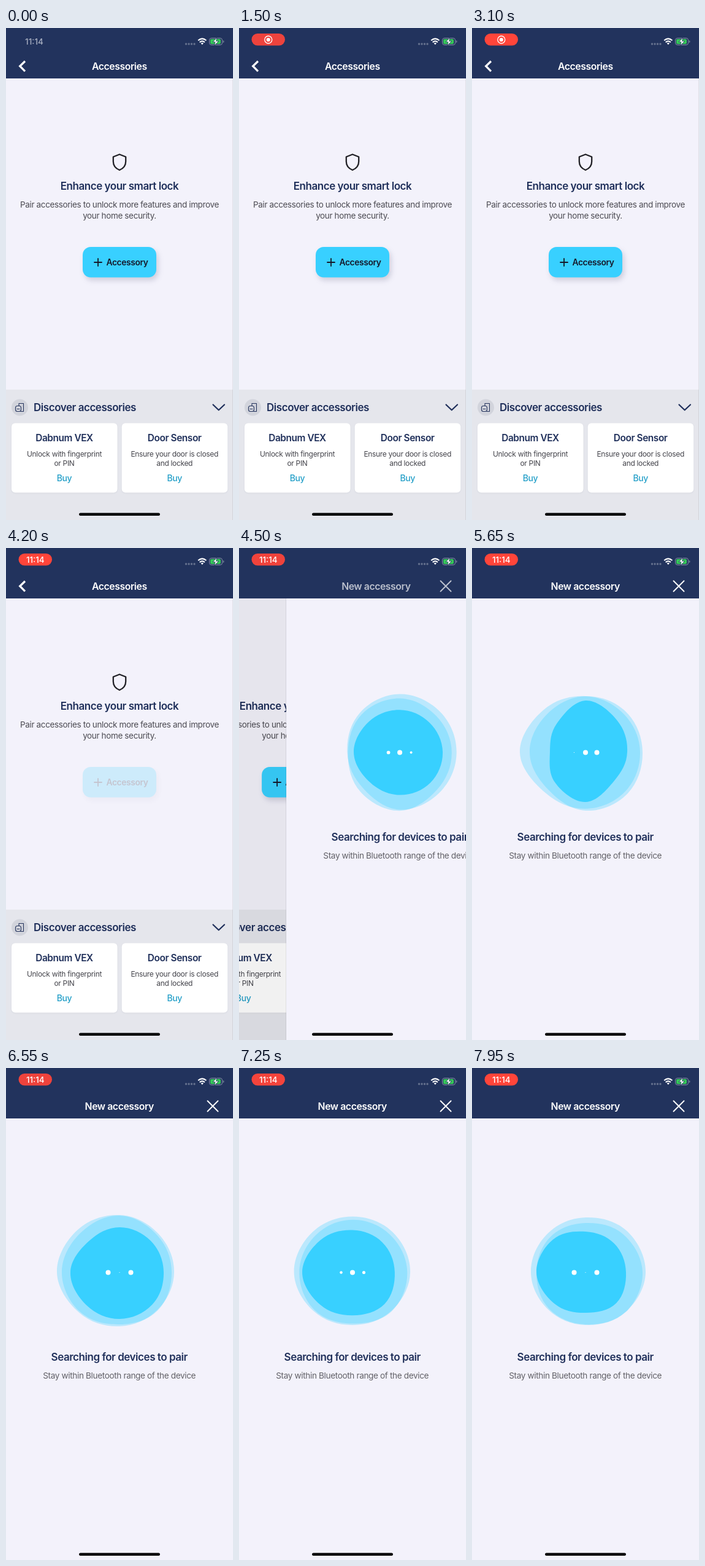
Animation of 370x800 px, one loop 8 s. Source, as an HTML page:

```html
<!DOCTYPE html>
<html lang="en">
<head>
<meta charset="utf-8">
<title>Accessories</title>
<style>
html, body { margin: 0; width: 100%; height: 100%; overflow: hidden; background: #f3f2fb; }
svg { display: block; width: 100vw; height: 100vh; }
text { font-family: Inter, "Open Sans", sans-serif; letter-spacing: -.027em; text-anchor: middle; }
.line { fill: none; stroke-linecap: round; stroke-linejoin: round; }
.bar { font-size: 15.8px; font-weight: 600; fill: #fff; }
.head { font-size: 17px; font-weight: 600; fill: #1f2f5a; }
.body { font-size: 13.5px; fill: #4c4b52; }
.name { font-size: 15.4px; font-weight: 600; fill: #1f2f5a; }
.note { font-size: 12px; fill: #45454c; }
.buy { font-size: 14px; font-weight: 500; fill: #249fc8; }
.clock { font-size: 13.5px; font-weight: 500; letter-spacing: 0; }
.shadow { filter: drop-shadow(3px 5px 4px rgba(60, 60, 100, .2)); }
.card { fill: #fff; filter: drop-shadow(0 1px 1px rgba(40, 50, 80, .07)); }
</style>
</head>
<body>
<svg viewBox="0 0 370 800" preserveAspectRatio="none">
  <g id="home">
    <rect width="370" height="800" fill="#f3f2fb"/>
    <path class="line" stroke="#222227" stroke-width="2.3" d="M185 205.5 195.2 209.5V217C195.2 223.5 191 228.5 185 231 179 228.5 174.8 223.5 174.8 217V209.5Z"/>
    <text class="head" x="185" y="263">Enhance your smart lock</text>
    <text class="body" x="185" y="292">Pair accessories to unlock more features and improve</text>
    <text class="body" x="185" y="310">your home security.</text>
    <g id="button">
      <rect class="shadow" x="125" y="356" width="120" height="49.5" rx="13" fill="#38d0ff"/>
      <path class="line" stroke="#15192b" stroke-width="1.8" d="M144 381H156M150 375V387"/>
      <text x="197.5" y="386" font-size="13.8" font-weight="600" fill="#15192b">Accessory</text>
    </g>
    <rect y="588" width="370" height="212" fill="#e5e6ec"/>
    <circle cx="22.5" cy="617" r="13.5" fill="#d2d4dc"/>
    <g class="line" stroke="#27365f" stroke-width="1.1">
      <path d="M21 614V610.5H28.5V623.5H24"/>
      <rect x="15.5" y="614.5" width="9" height="9" rx="3"/>
      <path d="M18 619.5H22"/>
    </g>
    <text class="head" x="128.5" y="623">Discover accessories</text>
    <path class="line" stroke="#1f2f5a" stroke-width="2.2" d="M337.5 612.5 346.7 621.3 356 612.5"/>
    <g id="cards"></g>
    <rect id="dim" width="370" height="800" opacity="0"/>
  </g>
  <g id="search">
    <rect x="-1" width="1" height="800" fill="#000" opacity=".08"/>
    <rect width="370" height="800" fill="#f3f2fb"/>
    <g id="blobs" fill="#38d0ff"></g>
    <g id="dots" fill="#fff"></g>
    <text class="head" x="184.7" y="476">Searching for devices to pair</text>
    <text class="body" x="184.7" y="505" style="font-size:13.6px;fill:#626167">Stay within Bluetooth range of the device</text>
  </g>

  <rect width="370" height="82" fill="#22335d"/>
  <text id="oldTitle" class="bar" x="184.8" y="68.3">Accessories</text>
  <path id="back" class="line" style="stroke-linecap:butt;stroke-linejoin:miter" stroke="#fff" stroke-width="3.2" d="M31 54 22.7 62 31 70.3"/>
  <text id="newTitle" class="bar" x="184.8" y="68.3">New accessory</text>
  <path id="close" class="line" stroke="#fff" stroke-width="1.9" d="M328.5 53.5 345.5 70.5M345.5 53.5 328.5 70.5"/>

  <g fill="#66728f">
    <circle cx="293.5" cy="26" r="1.7"/><circle cx="298" cy="26" r="1.7"/>
    <circle cx="302.5" cy="26" r="1.7"/><circle cx="307" cy="26" r="1.7"/>
  </g>
  <g class="line" stroke="#fff" stroke-width="2.1" style="stroke-linecap:butt">
    <path d="M313.2 20.2Q319.8 14.6 326.4 20.2M315.7 23.2Q319.8 19.6 323.9 23.2"/>
    <path d="M317.6 24.8Q319.8 23.2 322 24.8L319.8 27.2Z" fill="#fff" stroke="none"/>
  </g>
  <rect x="331.5" y="16.5" width="21" height="11" rx="3.4" fill="none" stroke="#8791a8"/>
  <path d="M354 20V24.2Q355.4 23.6 355.4 22.1T354 20" fill="#8791a8"/>
  <rect x="333" y="18" width="17" height="8" rx="2" fill="#35c759"/>
  <path d="M343.8 15.5 337 22.8H341L339.6 28.6 346.8 21.2H342.6Z" fill="#fff" stroke="#22335d" stroke-width=".8"/>

  <text id="plainClock" class="clock" x="46" y="26.7" fill="#a9b0c2">11:14</text>
  <rect id="pill" x="20.5" y="9" width="54.5" height="19.5" rx="9.75" fill="#ff453a"/>
  <g id="record" fill="#fff">
    <circle cx="47.8" cy="19" r="6" fill="none" stroke="#fff" stroke-width="1.3"/>
    <circle cx="47.8" cy="19" r="3.1"/>
  </g>
  <text id="pillClock" class="clock" x="47.8" y="23.8" fill="#fff">11:14</text>
  <rect x="119" y="788.5" width="132" height="4.5" rx="2.25" fill="#000"/>
</svg>
<script>
const LOOP = 8000, PUSH = 4340;
const el = id => document.getElementById(id);
const NS = "http://www.w3.org/2000/svg";

function add(parent, tag, attrs, label) {
  const node = document.createElementNS(NS, tag);
  for (const key in attrs) node.setAttribute(key, attrs[key]);
  if (label) node.textContent = label;
  return parent.appendChild(node);
}

function card(x, name, ...notes) {
  const mid = x + 86, box = el("cards");
  add(box, "rect", { class: "card", x, y: 642.5, width: 172.5, height: 113, rx: 6 });
  add(box, "text", { class: "name", x: mid, y: 671.7 }, name);
  notes.forEach((s, i) => add(box, "text", { class: "note", x: mid, y: 697 + 15 * i }, s));
  add(box, "text", { class: "buy", x: mid, y: 737 }, "Buy");
}
card(9, "Dabnum VEX", "Unlock with fingerprint", "or PIN");
card(188.7, "Door Sensor", "Ensure your door is closed", "and locked");

// Piecewise linear value, clamped at both ends.
function track(t, steps) {
  if (t <= steps[0][0]) return steps[0][1];
  for (let i = 1; i < steps.length; i++) {
    const [a, from] = steps[i - 1], [b, to] = steps[i];
    if (t < b) return from + (to - from) * (t - a) / (b - a);
  }
  return steps[steps.length - 1][1];
}

const PILL = [[50, 0], [450, .92], [1500, .92], [1600, .88], [2450, .88], [2700, 1], [3450, 1],
  [3600, .92], [3750, 1], [4350, 1], [4700, .85], [4800, .85], [5500, 1], [5800, 1],
  [6550, .92], [6750, .88], [7600, 1]];

// Radii at eight angles, clockwise from the right, one row per pose.
const POSE_TIMES = [4800, 5650, 6550, 7950];
const BLOBS = [
  { alpha: .3, poses: [
    [89, 92, 97, 84, 87, 94, 97, 91],
    [89, 91, 92, 93, 107, 97, 91, 88],
    [89, 87, 88, 93, 102, 97, 93, 89],
    [98, 92, 86, 86, 89, 88, 89, 95]] },
  { alpha: .3, poses: [
    [81, 84, 100, 94, 88, 91, 92, 83],
    [93, 96, 95, 86, 91, 88, 91, 93],
    [85, 88, 85, 91, 94, 90, 92, 86],
    [93, 92, 85, 84, 80, 81, 80, 87]] },
  { alpha: 1, poses: [
    [72, 70, 73, 68, 71, 68, 72, 70],
    [68, 66, 81, 70, 58, 66, 84, 73],
    [72, 75, 76, 76, 80, 71, 73, 72],
    [66, 71, 66, 72, 80, 75, 66, 66]] }
];
for (const blob of BLOBS) blob.node = add(el("blobs"), "path", { opacity: blob.alpha });
const dots = [166.5, 185, 203.5].map(cx => add(el("dots"), "circle", { cx, cy: 332.5 }));

function spline(a, b, c, d, u) {
  return b + u / 2 * (c - a + u * (2 * a - 5 * b + 4 * c - d + u * (3 * (b - c) + d - a)));
}

function radii(poses, t) {
  const pos = track(t, [[4000, -1], ...POSE_TIMES.map((time, i) => [time, i])]);
  const i = Math.floor(pos), pose = k => poses[(k + 4) % 4];
  return pose(0).map((_, n) =>
    spline(pose(i - 1)[n], pose(i)[n], pose(i + 1)[n], pose(i + 2)[n], pos - i));
}

function outline(rs) {
  const n = rs.length;
  const pts = rs.map((r, i) => [185 + r * Math.cos(i * 2 * Math.PI / n), 332 + r * Math.sin(i * 2 * Math.PI / n)]);
  const at = i => pts[(i + n) % n];
  const handle = (i, side) => [0, 1].map(k => at(i)[k] + side * (at(i + 1)[k] - at(i - 1)[k]) * .187);
  let d = "M" + at(0);
  for (let i = 0; i < n; i++) d += "C" + [handle(i, 1), handle(i + 1, -1), at(i + 1)].join(" ");
  return d + "Z";
}

function dotRadius(t, i) {
  const phase = (t - 4230 - i * 933.3 + 5600) % 1400;
  const near = Math.min(phase, 1400 - phase, 450) / 450;
  return .6 + 1.7 * (1 - Math.cos(Math.PI * near));
}

const show = (id, alpha) => el(id).setAttribute("opacity", alpha);
const shift = (id, x) => el(id).setAttribute("transform", `translate(${x} 0)`);

function draw(t) {
  show("plainClock", track(t, [[40, 1], [300, 0]]));
  show("pill", track(t, PILL));
  show("record", track(t, [[150, 0], [600, 1], [3100, 1], [3300, 0]]));
  show("pillClock", track(t, [[3200, 0], [3450, 1]]));
  show("button", t < 4200 ? 1 : track(t, [[4350, .2], [4500, 1]]));

  // Critically damped push of the new page over the old one.
  const w = Math.max(0, t - PUSH) * .01826;
  const p = 1 - (1 + w) * Math.exp(-w);
  shift("search", 370 * (1 - p));
  shift("home", -111 * p);
  show("dim", .07 * p);
  show("oldTitle", track(p, [[0, 1], [.5, 0]]));
  shift("oldTitle", -113 * Math.min(1, p * 2));
  show("back", track(p, [[0, 1], [.5, 0]]));
  show("newTitle", track(p, [[0, 0], [.4, .1], [1, 1]]));
  shift("newTitle", track(p, [[.5, 92.5], [1, 0]]));
  show("close", track(p, [[.3, 0], [1, 1]]));

  if (p > 0) {
    for (const blob of BLOBS) blob.node.setAttribute("d", outline(radii(blob.poses, t)));
    dots.forEach((dot, i) => dot.setAttribute("r", dotRadius(t, i)));
  }
}

function frame() {
  draw(performance.now() % LOOP);
  requestAnimationFrame(frame);
}
frame();
</script>
</body>
</html>
```
